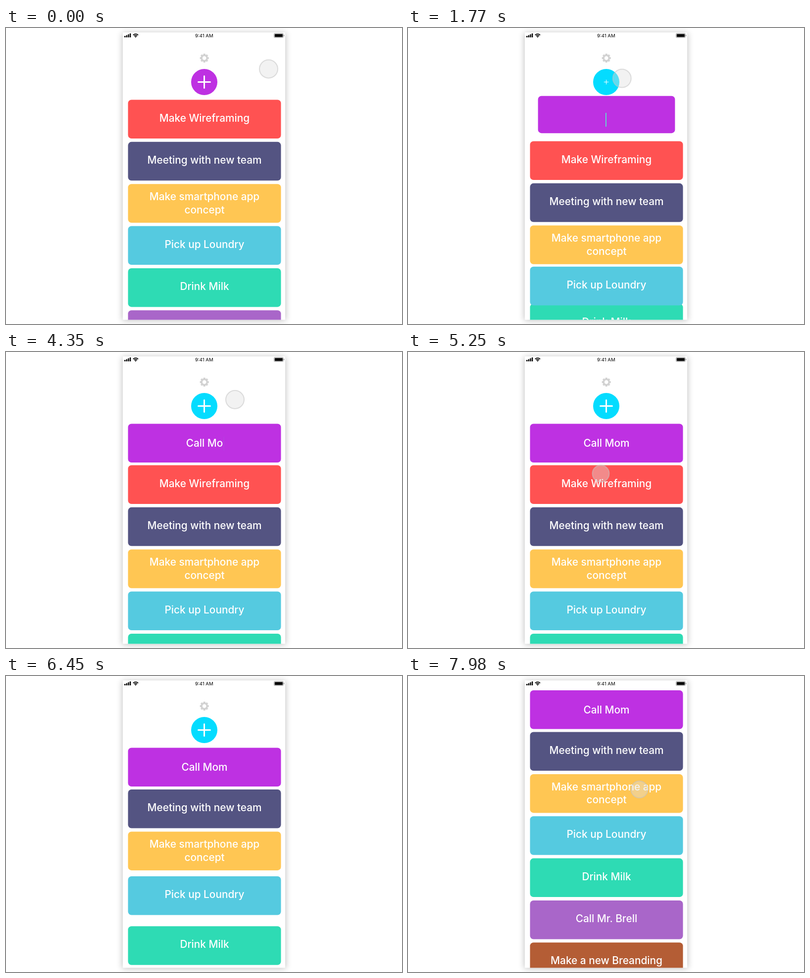
These frames come from a looping animation (800 px wide and 600 px high, 8000 ms). An HTML page:

```html
<!DOCTYPE html>
<html lang="en">
<head>
<meta charset="utf-8">
<title>To-do list</title>
<style>
  html, body { margin: 0; width: 100%; height: 100%; overflow: hidden; background: #fff; }
  svg { display: block; width: 100vw; height: 100vh; }
  text { font-family: Inter, Roboto, sans-serif; text-anchor: middle; }
  .label { font-size: 20.8px; font-weight: 500; fill: #fff; }
  .plus { stroke: #fff; stroke-width: 3; stroke-linecap: round; }
</style>
</head>
<body>
<svg viewBox="0 0 800 600">
  <defs>
    <filter id="blur" x="-20%" y="-20%" width="140%" height="140%"><feGaussianBlur stdDeviation="6.5"/></filter>
    <clipPath id="screen"><rect x="236" y="28" width="328" height="563.5"/></clipPath>
  </defs>
  <rect x="235" y="10" width="330" height="583" opacity=".24" filter="url(#blur)"/>
  <rect x="236" y="9" width="328" height="582.5" fill="#fff"/>

  <g id="status">
    <path d="M240.3 19v-3M243.9 19v-4.6M247.5 19v-6.2M251.1 19v-8" stroke="#000" stroke-width="2.4"/>
    <path d="M256.8 14.3a7.3 7.3 0 0 1 10.2 0M258.9 16.4a4.4 4.4 0 0 1 6 0" fill="none" stroke="#000" stroke-width="1.7"/>
    <path d="M261.9 19.6l-1.9-2a2.7 2.7 0 0 1 3.8 0z"/>
    <text x="400.3" y="19.4" font-size="9.6">9:41 AM</text>
    <rect x="541.5" y="11" width="18.8" height="8.4" rx="1.8" fill="none" stroke="#000" stroke-width=".7" opacity=".6"/>
    <rect x="542.8" y="12.2" width="16.2" height="6" rx=".8"/>
    <path d="M561.5 13.8v2.8" stroke="#000" stroke-width=".9" opacity=".6"/>
  </g>

  <g clip-path="url(#screen)">
    <g id="header">
      <g id="gear" transform="translate(400.7 61)" stroke="#d2d2d2" fill="none"></g>
      <circle id="add" r="26.5" fill="#04dcff"/>
      <path id="addPlus" class="plus" d="M-12 0h24M0-12v24"/>
    </g>
    <g id="cards"></g>
    <g id="fresh">
      <rect id="freshBox" fill="#be31e2"/>
      <path id="freshPlus" class="plus" d="M-12 0h24M0-12v24"/>
      <text id="typed" class="label" x="401" y="192.3"></text>
      <rect id="caret" y="172" width="1.8" height="28"/>
    </g>
    <circle id="touch" fill="#dedede" fill-opacity=".4" stroke="#c4c4c4" stroke-opacity=".55" stroke-width="2"/>
  </g>
</svg>
<script>
const LOOP = 8000;
const CX = 401, TOP = 145.5, PITCH = 85.35, CARD_W = 309, CARD_H = 78.5;
const PUSH = 84, PULL = 84.8, SCROLL = 116.5;
const ADD_X = 400.5, ADD_Y = 109.5, ADD_SIZE = 53;
const MORPH = 1230, LAND = 1530, SWIPE = 5680, AWAY = 6080, DRAG = 7630, DROP = 7975;

const $ = id => document.getElementById(id);
const set = (el, attrs) => { for (const k in attrs) el.setAttribute(k, attrs[k]); };
const make = (name, attrs, parent) => {
  const el = document.createElementNS('http://www.w3.org/2000/svg', name);
  set(el, attrs);
  return parent.appendChild(el);
};

const lerp = (a, b, u) => a + (b - a) * u;
const smooth = u => u * u * (3 - 2 * u);
const quad = u => u < .5 ? 2 * u * u : 1 - 2 * (1 - u) ** 2;
const ramp = (t, from, to, ease = smooth) =>
  ease(Math.max(0, Math.min(1, (t - from) / (to - from))));
const stagger = (t, from, step, i) => ramp(t, from + step * i, from + step * i + 280, quad);

const tasks = [
  ['#ff5252', 'Make Wireframing'],
  ['#545482', 'Meeting with new team'],
  ['#ffc653', 'Make smartphone app', 'concept'],
  ['#55cae0', 'Pick up Loundry'],
  ['#2edbb4', 'Drink Milk'],
  ['#a966c9', 'Call Mr. Brell'],
  ['#b45d35', 'Make a new Breanding']
];

const cards = tasks.map(([fill, ...lines]) => {
  const g = make('g', {}, $('cards'));
  make('rect', { x: CX - CARD_W / 2, width: CARD_W, height: CARD_H, rx: 7, fill }, g);
  lines.forEach((line, i) => {
    const y = lines.length > 1 ? 33 + 26.5 * i : 44;
    make('text', { class: 'label', x: CX, y }, g).textContent = line;
  });
  return g;
});
// Upper cards overlap lower ones.
cards.slice().reverse().forEach(g => $('cards').appendChild(g));

make('circle', { r: 5.6, 'stroke-width': 3.4 }, $('gear'));
for (let i = 0; i < 8; i++)
  make('path', { d: 'M0-6.5V-9', 'stroke-width': 4, transform: `rotate(${i * 45})` }, $('gear'));

function drawHeader(t, scroll) {
  const at = `translate(${ADD_X} ${ADD_Y})`;
  const plus = ramp(t, 1690, 1890);
  set($('header'), { transform: `translate(0 ${-scroll})`, opacity: 1 - ramp(t, DRAG, DROP - 75) });
  set($('add'), { transform: `${at} scale(${ramp(t, 1390, 1620)})` });
  set($('addPlus'), { transform: `${at} scale(${plus})`, opacity: plus ? 1 : 0 });
}

function drawCards(t, scroll) {
  cards.forEach((g, i) => {
    let x = 0, y = TOP + PITCH * i + PUSH * stagger(t, 1385, 45, i);
    if (i) y -= PULL * stagger(t, 6120, 50, i - 1);
    else x = 330 * ramp(t, SWIPE, AWAY);
    set(g, { transform: `translate(${x} ${y - scroll})` });
  });
}

// The button drops out as a card, then settles like a damped spring.
function drawFresh(t, scroll) {
  const grow = ramp(t, MORPH, LAND), after = Math.max(0, t - LAND);
  const wobble = Math.exp(-after / 300) * Math.cos(after / 240 * Math.PI);
  const cy = lerp(ADD_Y, TOP + CARD_H / 2 + 20.75 * wobble, grow);
  const w = lerp(ADD_SIZE, CARD_W + 72 * wobble, grow);
  const h = lerp(ADD_SIZE, CARD_H + 7 * wobble, grow);
  const cx = lerp(ADD_X, CX, grow);
  set($('fresh'), { transform: `translate(0 ${-scroll})` });
  set($('freshBox'), { x: cx - w / 2, y: cy - h / 2, width: w, height: h, rx: lerp(ADD_SIZE / 2, 7, grow) });
  set($('freshPlus'), { transform: `translate(${cx} ${cy})`, opacity: 1 - ramp(t, 1200, 1330) });
  drawTyping(t);
}

function drawTyping(t) {
  const word = 'Call Mom', text = $('typed');
  const count = Math.floor(ramp(t, 3450, 4450, u => u) * word.length);
  text.textContent = word.slice(0, count);
  const half = count ? text.getComputedTextLength() / 2 + 3 : 0;
  const tint = ramp(t, LAND, 1740);
  const blink = .5 + .5 * Math.cos((t - 1770) / 500 * Math.PI);
  set($('caret'), {
    x: lerp(402, 399, tint) + half,
    fill: `rgb(${lerp(210, 91, tint)},${lerp(200, 230, tint)},203)`,
    opacity: t < 1480 || t > 4750 ? 0 : lerp(.9, blink, tint)
  });
}

function drawTouch(t) {
  let x = 530.5, y = 83;
  const glide = (from, to, tx, ty) => {
    const u = ramp(t, from, to);
    x = lerp(x, tx, u);
    y = lerp(y, ty, u);
  };
  const press = (from, to) => ramp(t, from, from + 100) - ramp(t, to, to + 100);
  glide(150, 1050, 397.5, 108.5);
  glide(1520, 2000, 462.5, 96.5);
  glide(4450, 5100, 389.5, 246.5);
  glide(SWIPE, AWAY, 720, 250);
  glide(7180, 7560, 476, 346);
  glide(DRAG, DROP, 467.5, 230);
  const held = press(1080, 1200) + press(5130, AWAY) + press(7540, LOOP);
  set($('touch'), { cx: x, cy: y, r: 18.5 - 1.5 * held });
}

function render(t) {
  const scroll = SCROLL * ramp(t, DRAG, DROP);
  drawHeader(t, scroll);
  drawCards(t, scroll);
  drawFresh(t, scroll);
  drawTouch(t);
}

const start = performance.now();
function frame() {
  render((performance.now() - start) % LOOP);
  requestAnimationFrame(frame);
}
frame();
</script>
</body>
</html>
```
